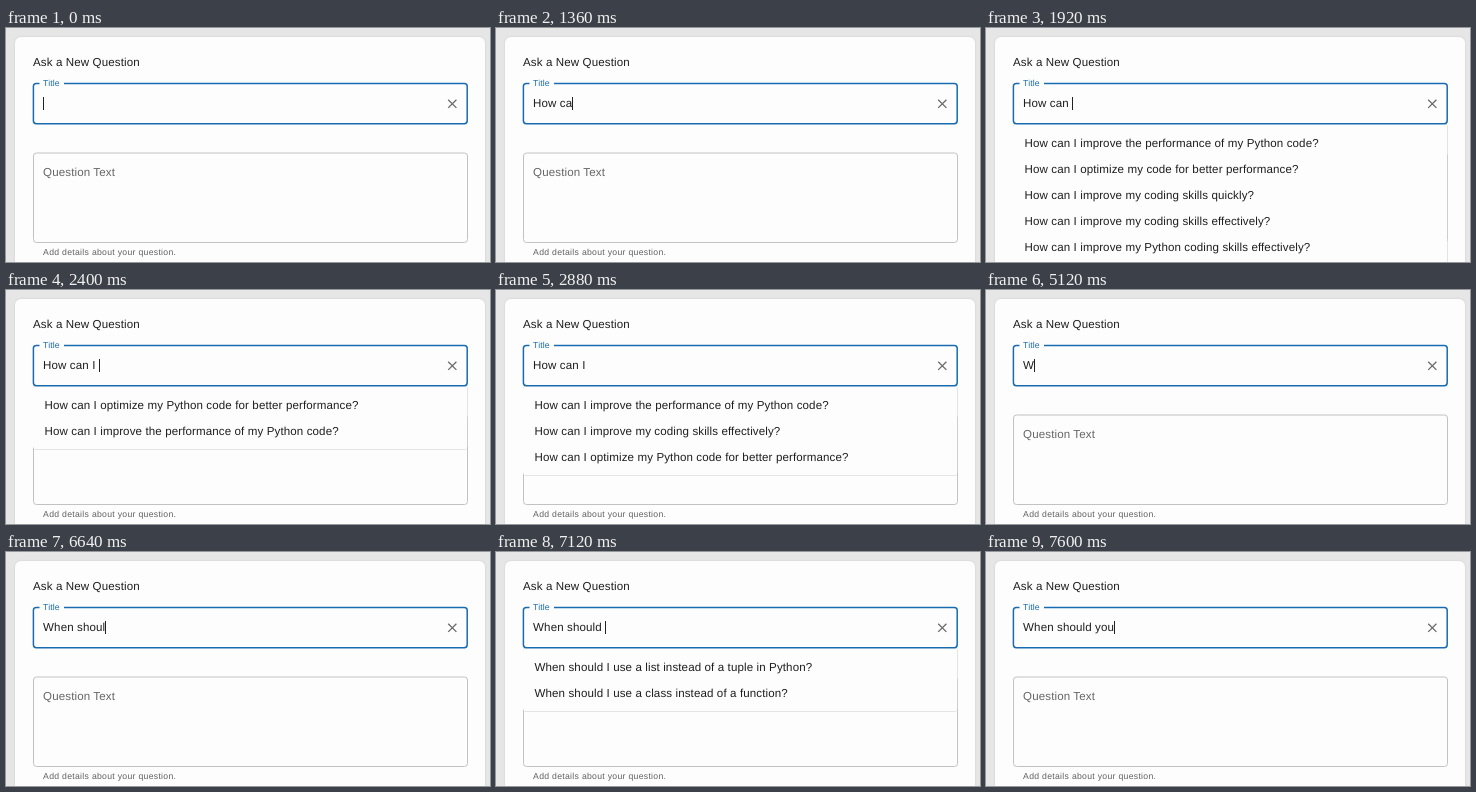
An HTML page that plays this animation: 484 by 234 pixels, repeating every 8 s.

```html
<!DOCTYPE html>
<html lang="en">
<head>
<meta charset="utf-8">
<title>Ask a New Question</title>
<style>
  html, body { margin: 0; width: 100%; height: 100%; overflow: hidden; background: #e6e6e6; }
  svg { display: block; width: 484px; height: 234px; }
  text {
    font: 11.57px "Liberation Sans", Arial, sans-serif;
    letter-spacing: .00938em; fill: #1e1e1e; white-space: pre;
    text-rendering: geometricPrecision;
  }
  .label { fill: #666; }
  .small { font-size: 8.68px; }
  .helper { fill: #606060; letter-spacing: .0333em; }
  .focus { fill: #186ba8; }
  .card { fill: #fdfdfd; filter: drop-shadow(0 .5px 1px rgba(0, 0, 0, .1)); }
  .popup { fill: #fdfdfd; filter: drop-shadow(0 .8px .7px rgba(0, 0, 0, .4)); }
</style>
</head>
<body>
<svg viewBox="0 0 484 234">
  <rect width="484" height="234" fill="#e6e6e6"/>
  <rect class="card" x="9" y="9" width="470" height="260" rx="6"/>
  <text x="27" y="38">Ask a New Question</text>

  <rect x="27.5" y="125" width="434" height="89.5" rx="3" fill="none" stroke="#c2c2c2"/>
  <text class="label" x="37.1" y="148">Question Text</text>
  <text class="small helper" x="37.1" y="227">Add details about your question.</text>

  <g id="menu">
    <rect id="sheet" class="popup" x="27" y="96" width="434.5" rx="3"/>
    <g id="rows"></g>
  </g>

  <rect x="27.4" y="55.4" width="433.8" height="40.3" rx="2.9" fill="#fdfdfd" stroke="#186bb0" stroke-width="1.5"/>
  <rect x="33.5" y="53" width="24.5" height="5" fill="#fdfdfd"/>
  <text class="small focus" x="37.1" y="58">Title</text>
  <text id="input" x="37.1" y="79"></text>
  <rect id="caret" y="69" width="1" height="13" fill="#222"/>
  <path d="M442.2 71.7l8.2 8.2m0-8.2l-8.2 8.2" stroke="#6a6a6a" stroke-width="1.3"/>
</svg>
<script>
const LOOP = 8000, LEFT = 37.1, ROW = 26;
const $ = id => document.getElementById(id);
const input = $("input"), caret = $("caret"), menu = $("menu"), sheet = $("sheet"), rows = $("rows");

// Each track is a list of [start time, value]; a value holds until the next one.
const typing = [
  [0, ""], [400, "H"], [720, "Ho"], [800, "How"], [960, "How "], [1200, "How c"],
  [1360, "How ca"], [1520, "How can"], [1600, "How can "], [2240, "How can I"],
  [2320, "How can I "], [4560, ""], [5120, "W"], [5440, "Wh"], [5520, "Whe"],
  [5680, "When"], [5760, "When "], [6080, "When s"], [6160, "When sh"],
  [6320, "When sho"], [6480, "When shou"], [6640, "When shoul"], [6800, "When should"],
  [6880, "When should "], [7200, "When should y"], [7360, "When should yo"], [7520, "When should you"]
];

const blink = [[0, 1], [2880, 0], [3360, 1], [3920, 0], [4560, 1]];

const perf = "How can I improve the performance of my Python code?";
const faster = "How can I optimize my Python code for better performance?";
const quickly = "How can I improve my coding skills quickly?";
const skills = "How can I improve my coding skills effectively?";
const tuned = "How can I optimize my code for better performance?";
const pySkills = "How can I improve my Python coding skills effectively?";
const lists = "When should I use a list instead of a tuple in Python?";
const classes = "When should I use a class instead of a function?";

const hints = [
  [0, []],
  [1680, [tuned, quickly, skills]],
  [1920, [perf, tuned, quickly, skills, pySkills]],
  [2080, []],
  [2400, [faster, perf]],
  [2800, [perf, skills, faster]],
  [2960, [perf, skills]],
  [4560, []],
  [6960, [lists]],
  [7120, [lists, classes]],
  [7200, []]
];

const at = (track, t) => track.findLast(step => step[0] <= t)[1];

function addRow(label, i) {
  const row = document.createElementNS("http://www.w3.org/2000/svg", "text");
  row.setAttribute("x", 38.5);
  row.setAttribute("y", 119 + ROW * i);
  row.textContent = label;
  rows.append(row);
}

let shownText = null, shownHints = null;

function draw(t) {
  const text = at(typing, t), list = at(hints, t);
  if (text !== shownText) {
    shownText = input.textContent = text;
    const width = text ? input.getComputedTextLength() : 0;
    caret.setAttribute("x", Math.round(LEFT + width));
  }
  caret.setAttribute("opacity", at(blink, t));
  if (list !== shownHints) {
    shownHints = list;
    rows.replaceChildren();
    list.forEach(addRow);
    sheet.setAttribute("height", 11.6 + ROW * list.length);
    menu.setAttribute("visibility", list.length ? "visible" : "hidden");
  }
}

const start = performance.now();
function tick() {
  draw((performance.now() - start) % LOOP);
  requestAnimationFrame(tick);
}
tick();
</script>
</body>
</html>
```
